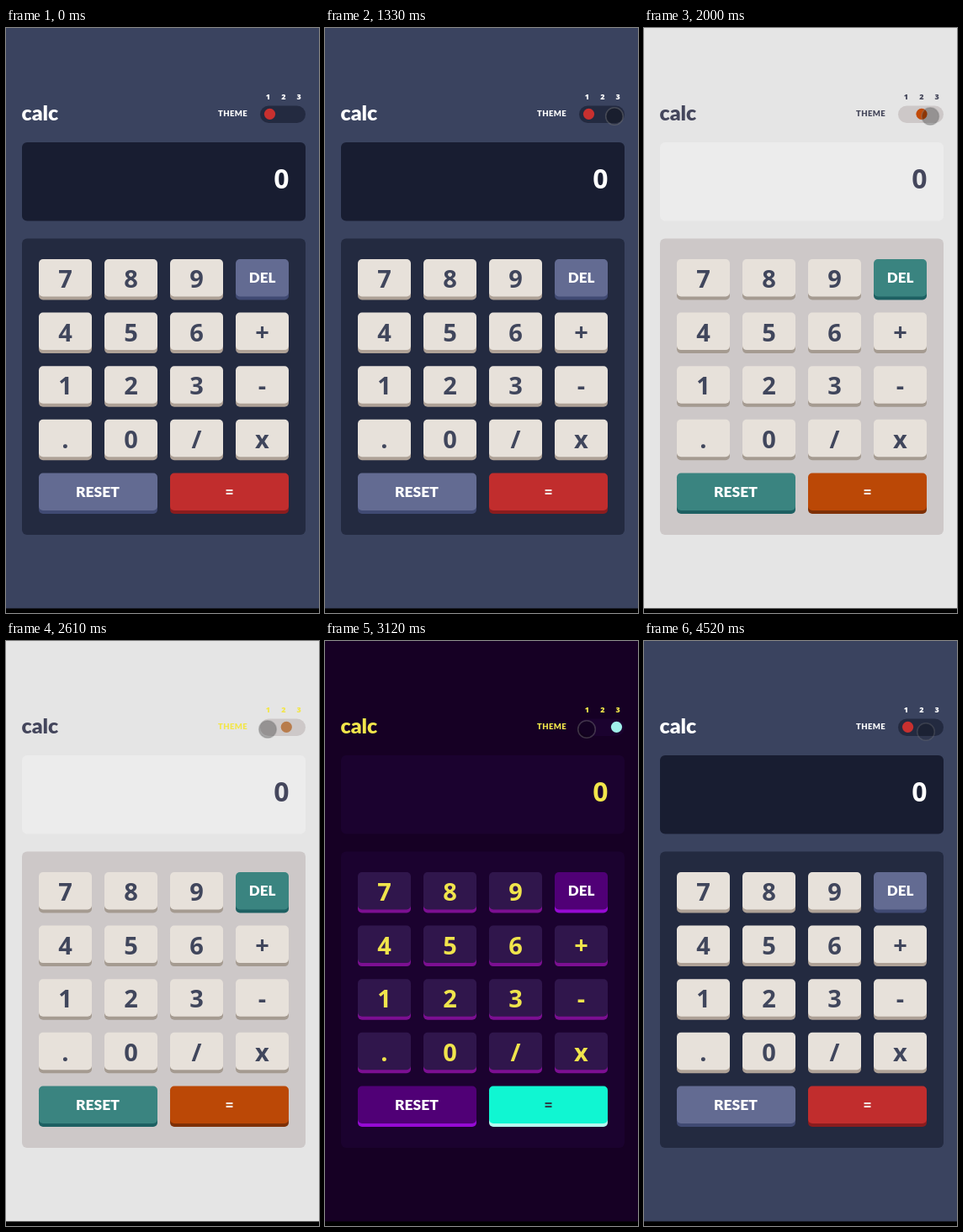
These frames come from a looping animation (372 px wide and 696 px high, 4560 ms). An HTML page with a canvas:

```html
<!DOCTYPE html>
<html lang="en">
<head>
<meta charset="utf-8">
<title>Calculator themes</title>
<style>
  html, body { margin: 0; width: 100%; height: 100%; overflow: hidden; background: #000; }
  canvas { display: block; width: 372px; height: 696px; }
</style>
</head>
<body>
<canvas id="stage"></canvas>
<script>
const W = 372, H = 696, LOOP = 4560;
const canvas = document.getElementById('stage');
const ctx = canvas.getContext('2d');
const dpr = window.devicePixelRatio || 1;
canvas.width = W * dpr;
canvas.height = H * dpr;

const DIGITS = '"Open Sans", sans-serif';
const WORDS = 'Lato, sans-serif';

const themes = [
  { bg: '#3a435f', pad: '#232a40', screen: '#181d31', text: '#ffffff', label: '#ffffff',
    key: '#e7e1da', keyEdge: '#aea196', keyText: '#40465c',
    alt: '#636b92', altEdge: '#404a73', main: '#c12d2d', mainEdge: '#8a1c1e',
    mainText: '#f2e4e0', knob: '#c8302f', knobX: 313.5 },
  { bg: '#e5e5e5', pad: '#cdc8c8', screen: '#ececec', text: '#44465c', label: '#44465a',
    key: '#e7e1da', keyEdge: '#a59b91', keyText: '#40465c',
    alt: '#3a8480', altEdge: '#1d6062', main: '#bb4806', mainEdge: '#7e3006',
    mainText: '#f2e8e0', knob: '#c24a08', knobX: 330 },
  { bg: '#160024', pad: '#1b022f', screen: '#1b022f', text: '#f2e64b', label: '#f2e64b',
    key: '#30164c', keyEdge: '#7c0f92', keyText: '#f0e44c',
    alt: '#500076', altEdge: '#960ad4', main: '#10f6d2', mainEdge: '#b4faf0',
    mainText: '#2c4048', knob: '#a0f0ea', knobX: 346.5 }
];

// at: knob starts moving; tint: delay before the knob changes colour
const switches = [
  { at: 1373, tint: 100 },
  { at: 2517, tint: 33 },
  { at: 3961, tint: 100 }
];
const SLIDE = 600, FADE = 300, FADE_DELAY = 97, LABEL_DELAY = 85;

// Pointer path: time, x, y, opacity
const pointerPath = [
  [60, 390, 108, 1], [560, 346, 106, 1], [1120, 344, 105, 1],
  [1900, 344, 105, 1], [2380, 311, 105, 1],
  [4240, 311, 105, 1], [4520, 335, 108, 0.7], [4560, 338, 109, 0.4]
];

const clamp = v => Math.min(1, Math.max(0, v));
const lerp = (a, b, p) => a + (b - a) * p;

// cubic-bezier(.25, .1, .25, 1)
function ease(x) {
  if (x <= 0) return 0;
  if (x >= 1) return 1;
  const curve = (a, b, u) => 3 * a * u * (1 - u) ** 2 + 3 * b * u * u * (1 - u) + u ** 3;
  let lo = 0, hi = 1;
  for (let i = 0; i < 24; i++) {
    const mid = (lo + hi) / 2;
    if (curve(0.25, 0.25, mid) < x) lo = mid; else hi = mid;
  }
  return curve(0.1, 1, lo);
}

function mix(a, b, p) {
  const part = (hex, i) => parseInt(hex.substr(1 + 2 * i, 2), 16);
  return 'rgb(' + [0, 1, 2].map(i => Math.round(lerp(part(a, i), part(b, i), p))) + ')';
}

function paletteAt(t) {
  let step = switches.length - 1;
  while (step > 0 && t < switches[step].at) step--;
  const from = themes[step], to = themes[(step + 1) % themes.length];
  const since = t - switches[step].at;
  const fade = ease((since - FADE_DELAY) / FADE);
  const look = {};
  for (const name in from) if (name !== 'knobX') look[name] = mix(from[name], to[name], fade);
  look.label = since < LABEL_DELAY ? from.label : to.label;
  look.knob = mix(from.knob, to.knob, ease((since - switches[step].tint) / FADE));
  look.knobX = lerp(from.knobX, to.knobX, ease(since / SLIDE));
  return look;
}

function box(x, y, w, h, r, color) {
  ctx.fillStyle = color;
  ctx.beginPath();
  ctx.roundRect(x, y, w, h, r);
  ctx.fill();
}

function write(str, x, y, font, color, align = 'center') {
  ctx.font = font;
  ctx.fillStyle = color;
  ctx.textAlign = align;
  ctx.fillText(str, x, y);
}

function button(x, y, w, face, edge) {
  box(x, y + 4, w, 44.5, 5, edge);
  box(x, y, w, 44.5, 5, face);
}

function drawHeader(c) {
  write('calc', 18.5, 110, `900 25px ${WORDS}`, c.text, 'left');
  ctx.letterSpacing = '0.4px';
  write('THEME', 252, 105, `900 9.5px ${WORDS}`, c.label, 'left');
  ctx.letterSpacing = '0px';
  ['1', '2', '3'].forEach((n, i) =>
    write(n, 311.5 + 18.3 * i, 85, `800 9px ${DIGITS}`, c.label));
  box(302, 92.5, 54, 20.5, 10.2, c.pad);
  ctx.fillStyle = c.knob;
  ctx.beginPath();
  ctx.arc(c.knobX, 102.3, 6.6, 0, 7);
  ctx.fill();
}

function drawKeys(c) {
  const rows = ['789D', '456+', '123-', '.0/x'];
  rows.forEach((row, r) => [...row].forEach((char, i) => {
    const x = 39 + 78 * i, y = 275 + 63.6 * r;
    if (char === 'D') {
      button(x, y, 63, c.alt, c.altEdge);
      write('DEL', x + 31.5, 303, `900 17px ${WORDS}`, '#ffffff');
    } else {
      button(x, y, 63, c.key, c.keyEdge);
      const lift = char === '+' ? 1 : 0;
      write(char, x + 31.5, y + 34.2 - lift, `700 29px ${DIGITS}`, c.keyText);
    }
  }));
  button(39, 529.5, 141, c.alt, c.altEdge);
  write('RESET', 109, 558.3, `900 17.5px ${WORDS}`, '#ffffff');
  button(195, 529.5, 141, c.main, c.mainEdge);
  write('=', 265.5, 557.5, `800 16px ${DIGITS}`, c.mainText);
}

function drawPointer(t) {
  const next = pointerPath.findIndex(p => p[0] >= t);
  if (next < 1) return;
  const a = pointerPath[next - 1], b = pointerPath[next];
  const p = clamp((t - a[0]) / (b[0] - a[0]));
  const move = p * p * (3 - 2 * p);
  ctx.globalAlpha = lerp(a[3], b[3], p);
  ctx.beginPath();
  ctx.arc(lerp(a[1], b[1], move), lerp(a[2], b[2], move), 10.3, 0, 7);
  ctx.fillStyle = 'rgba(0,0,0,.27)';
  ctx.fill();
  ctx.strokeStyle = 'rgba(128,128,128,.4)';
  ctx.lineWidth = 1.6;
  ctx.stroke();
  ctx.globalAlpha = 1;
}

function draw(t) {
  const c = paletteAt(t);
  ctx.setTransform(dpr, 0, 0, dpr, 0, 0);
  ctx.fillStyle = c.bg;
  ctx.fillRect(0, 0, W, H);
  drawHeader(c);
  box(19, 136, 337, 93.5, 6, c.screen);
  write('0', 336.5, 190.5, `700 32px ${DIGITS}`, c.text, 'right');
  box(19, 250.5, 337, 352.5, 6, c.pad);
  drawKeys(c);
  drawPointer(t);
  ctx.fillStyle = '#000';
  ctx.fillRect(0, 690.5, W, 5.5);
}

const start = performance.now();
function tick() {
  draw((performance.now() - start) % LOOP);
  requestAnimationFrame(tick);
}
tick();
</script>
</body>
</html>
```
